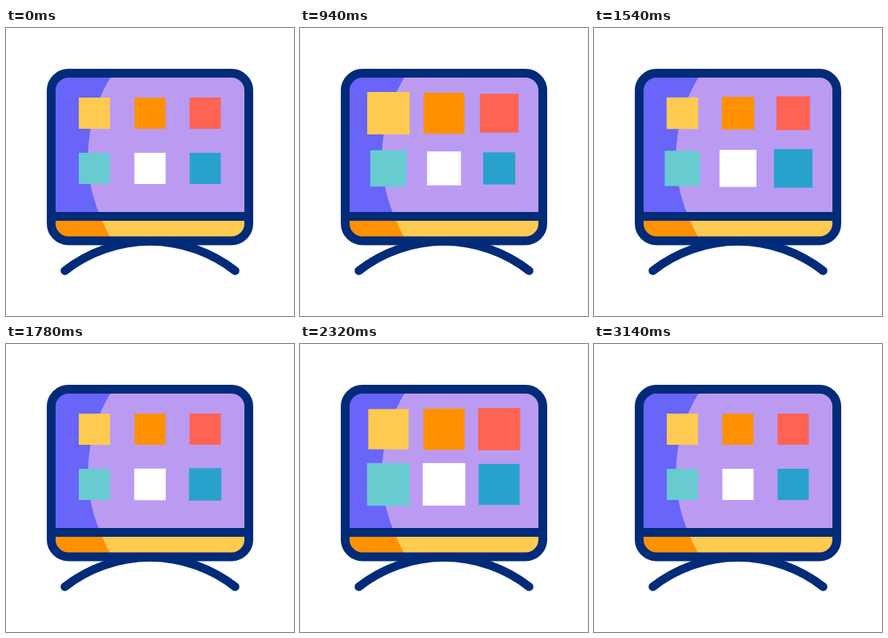
These frames come from a looping animation (360x360 px, 3.6 s). An HTML page:

```html
<!DOCTYPE html>
<html lang="en">
<head>
<meta charset="utf-8">
<title>Screen with pulsing tiles</title>
<style>
  html, body { margin: 0; width: 100%; height: 100%; overflow: hidden; background: #fff; }
  svg { display: block; width: 100%; height: 100%; }
</style>
</head>
<body>
<svg viewBox="0 0 360 360">
  <defs>
    <clipPath id="screen"><rect x="56.5" y="56.5" width="247" height="209.5" rx="21.5"/></clipPath>
  </defs>
  <g clip-path="url(#screen)">
    <rect x="56" y="56" width="248" height="180" fill="#6865f8"/>
    <rect x="56" y="236" width="248" height="32" fill="#ff9100"/>
    <path d="M304 56H134.3A189 189 0 0 0 118.1 236H304Z" fill="#bb9bf2"/>
    <path d="M304 236H118.1A189 189 0 0 0 133.3 267H304Z" fill="#ffca50"/>
  </g>
  <g fill="none" stroke="#002b79" stroke-width="11">
    <path d="M57 235.5H303"/>
    <rect x="56.5" y="56.5" width="247" height="209.5" rx="21.5"/>
    <path d="M73.5 303.5A173 173 0 0 1 286.5 303.5" stroke-width="10.5" stroke-linecap="round"/>
  </g>
  <g id="tiles"></g>
</svg>
<script>
  const LOOP = 3600, BASE = 39, GROW = 14.5;
  const COLORS = ['#ffca50', '#ff9100', '#ff6353', '#67cbd0', '#ffffff', '#28a2cc'];
  const COLUMNS = [110.5, 180, 249];
  const ROWS = [106.5, 175.5];

  // Each moment is [time of the first tile, delay per following tile].
  const PULSES = [
    { start: [568, 60], peak: [988, 60], end: [1610, 60] },
    { start: [1815, 50], peak: [2155, 50], end: [2705, 9] }
  ];

  const group = document.getElementById('tiles');
  const tiles = COLORS.map(color => {
    const tile = document.createElementNS('http://www.w3.org/2000/svg', 'rect');
    tile.setAttribute('fill', color);
    return group.appendChild(tile);
  });

  const smooth = (from, to, t) => {
    const x = Math.min(1, Math.max(0, (t - from) / (to - from)));
    return x * x * (3 - 2 * x);
  };

  function swell(t, i) {
    return PULSES.reduce((sum, pulse) => {
      const at = ([time, delay]) => time + delay * i;
      const peak = at(pulse.peak);
      return sum + smooth(at(pulse.start), peak, t) - smooth(peak, at(pulse.end), t);
    }, 0);
  }

  function draw(t) {
    tiles.forEach((tile, i) => {
      const size = BASE + GROW * swell(t, i);
      tile.setAttribute('x', COLUMNS[i % 3] - size / 2);
      tile.setAttribute('y', ROWS[Math.floor(i / 3)] - size / 2);
      tile.setAttribute('width', size);
      tile.setAttribute('height', size);
    });
  }

  function tick() {
    draw(performance.now() % LOOP);
    requestAnimationFrame(tick);
  }
  tick();
</script>
</body>
</html>
```
